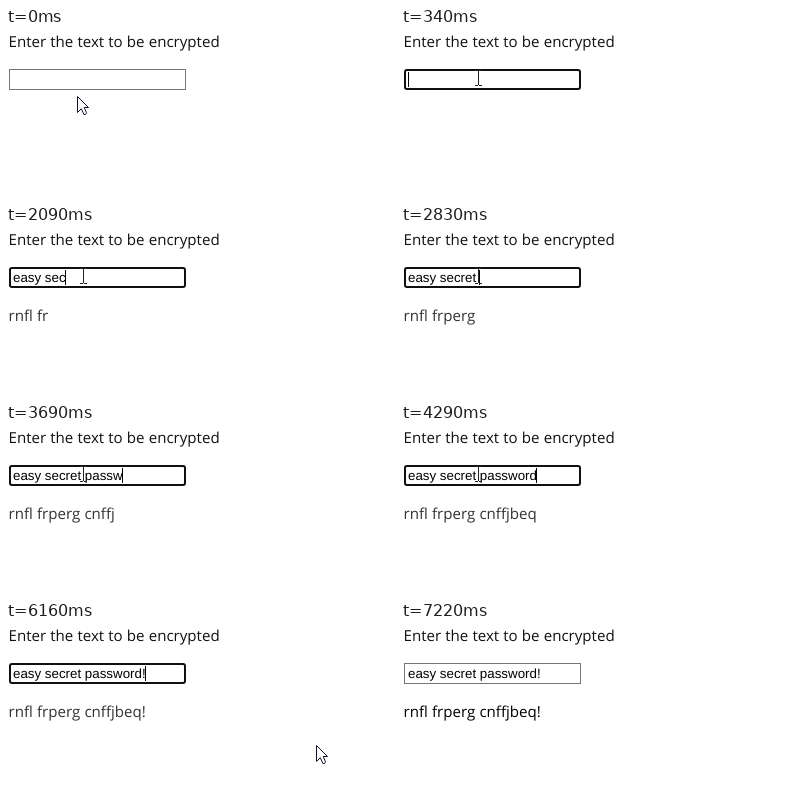
Animation of 389 by 170 pixels, one loop 7360 ms. Source, as an HTML page:

```html
<!DOCTYPE html>
<html lang="en">
<head>
<meta charset="utf-8">
<title>Text encryption</title>
<style>
  html, body { margin: 0; width: 100%; height: 100%; overflow: hidden; background: #fff; }
  svg { display: block; }
  text { white-space: pre; text-rendering: geometricPrecision; }
  .label { font: 15.1px "Open Sans", "Noto Sans", sans-serif; word-spacing: .2px; font-variant-ligatures: none; }
  .field { font: 13.333px "Liberation Sans", Arial, sans-serif; }
</style>
</head>
<body>
<svg width="389" height="170" viewBox="0 0 389 170">
  <text class="label" x="2.5" y="19" fill="#111">Enter the text to be encrypted</text>
  <rect id="idle" x="3.5" y="41.5" width="176" height="20" fill="#fff" stroke="#767676"/>
  <rect id="focus" x="4" y="42" width="175" height="19" rx="2" fill="#fff" stroke="#101010" stroke-width="2"/>
  <text id="input" class="field" x="7" y="56"></text>
  <rect id="caret" y="44" width="1" height="15"/>
  <text id="output" class="label" x="2.5" y="95"></text>
  <path id="arrow" d="M.5 .5V16.5L4.3 12.7 6.9 18.5H8.5L9.5 16.8 7.2 11.5H11.5Z" fill="#fff" stroke="#14142c"/>
  <path id="beam" d="M-3 -7.5H0M1 -7.5H4M.5 -7V7M-3 7.5H0M1 7.5H4" fill="none" stroke="#222"/>
</svg>
<script>
const LOOP = 7360, BLINK = 530, FOCUS_AT = 280, BLUR_AT = 7220;
const message = "easy secret password!";

// Time of each key press, and of the encrypted letter where it lags behind.
const keyTimes = [410, 680, 1010, 1140, 1560, 1630, 1830, 2090, 2300, 2430, 2630,
  2830, 3160, 3230, 3430, 3560, 3690, 3820, 3960, 4290, 6160];
const lateOutput = { 0: 480, 5: 1690, 7: 2160, 8: 2360, 14: 3490 };
const outputTimes = keyTimes.map((t, i) => lateOutput[i] || t);

// [time, shape, x, y]
const pointer = [
  [0, "arrow", 71, 68], [70, "arrow", 75, 63], [140, "beam", 77, 53], [210, "beam", 77, 50],
  [5550, "beam", 56, 60], [5620, "arrow", 46, 76], [5690, "arrow", 56, 94],
  [5760, "arrow", 92, 112], [5830, "arrow", 150, 123], [5890, "arrow", 218, 128],
  [5960, "arrow", 276, 127], [6030, "arrow", 310, 123],
  [6750, "arrow", 322, 139], [6820, "arrow", 333, 157], [6890, "none", 0, 0]
];

const el = id => document.getElementById(id);
const show = (id, on) => el(id).setAttribute("visibility", on ? "visible" : "hidden");
const countUntil = (times, t) => times.filter(x => x <= t).length;
const rot13 = s => s.replace(/[a-z]/g, c =>
  String.fromCharCode((c.charCodeAt(0) - 97 + 13) % 26 + 97));

function caretOn(t, typed) {
  if (t >= 1280 && t < 1560) return false;
  const since = typed ? keyTimes[typed - 1] : FOCUS_AT;
  return Math.floor((t - since) / BLINK) % 2 === 0;
}

function render(t) {
  const focused = t >= FOCUS_AT && t < BLUR_AT;
  const typed = countUntil(keyTimes, t);
  const input = el("input"), output = el("output");
  input.textContent = message.slice(0, typed);
  output.textContent = rot13(message.slice(0, countUntil(outputTimes, t)));
  output.setAttribute("fill", focused ? "#333" : "#000");
  el("caret").setAttribute("x", Math.floor(7 + (typed ? input.getComputedTextLength() : 0)));
  show("idle", !focused);
  show("focus", focused);
  show("caret", focused && caretOn(t, typed));

  const [, shape, x, y] = pointer[countUntil(pointer.map(p => p[0]), t) - 1];
  for (const id of ["arrow", "beam"]) {
    show(id, id === shape);
    el(id).setAttribute("transform", `translate(${x} ${y})`);
  }
}

const start = performance.now();
function tick() {
  render((performance.now() - start) % LOOP);
  requestAnimationFrame(tick);
}
tick();
</script>
</body>
</html>
```
